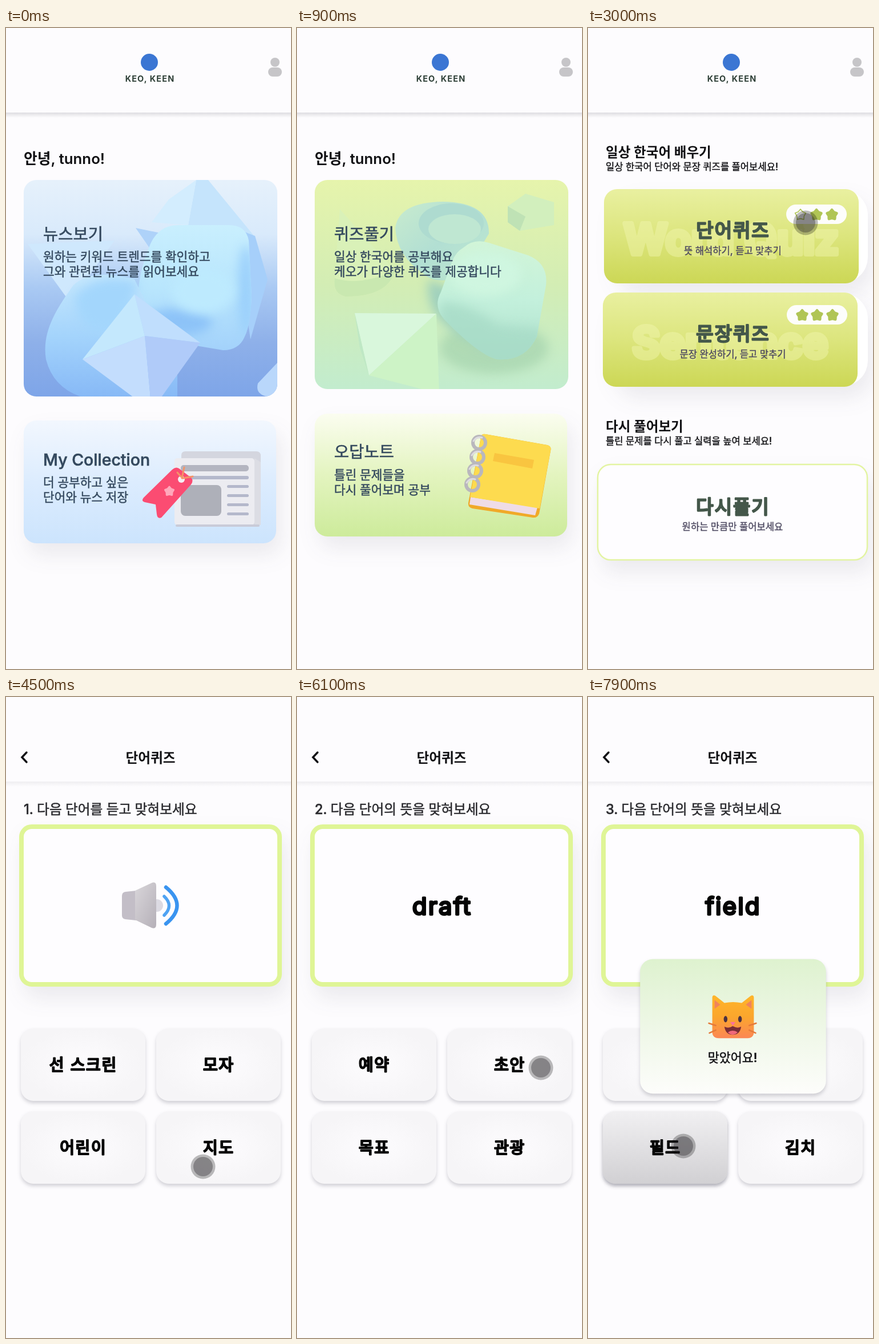
Recreate the animation shown at these times as an HTML page. Size 499 px wide and 1122 px high, loop 8000 ms.

```html
<!DOCTYPE html>
<html lang="ko">
<head>
<meta charset="utf-8">
<style>
html, body { margin: 0; width: 100%; height: 100%; overflow: hidden; background: #fdfcfe; }
svg { display: block; font-family: Inter, 'Noto Sans CJK KR', 'Noto Sans CJK', sans-serif; }
.soft { filter: drop-shadow(8px 20px 18px rgba(60,60,80,.09)); }
.key { filter: drop-shadow(0 4px 3px rgba(40,40,60,.2)); }
.blur { filter: blur(9px); }
.round { stroke: currentColor; stroke-width: .085em; stroke-linejoin: round; letter-spacing: .06em; }
</style>
</head>
<body>
<script>
const LOOP = 8000, INK = '#34495e', DARK = '#111114';
const rect = (x, y, w, h, r, fill, more = '') =>
  `<rect x="${x}" y="${y}" width="${w}" height="${h}" rx="${r}" fill="${fill}" ${more}/>`;
const circle = (x, y, r, fill, more = '') => `<circle cx="${x}" cy="${y}" r="${r}" fill="${fill}" ${more}/>`;
const ellipse = (x, y, rx, ry, fill, more = '') => `<ellipse cx="${x}" cy="${y}" rx="${rx}" ry="${ry}" fill="${fill}" ${more}/>`;
const path = (d, fill, more = '') => `<path d="${d}" fill="${fill}" ${more}/>`;
const stroke = (d, color, width) => path(d, 'none', `stroke="${color}" stroke-width="${width}" stroke-linecap="round"`);
const text = (s, x, y, size, weight = 500, fill = INK, more = '') =>
  `<text x="${x}" y="${y}" font-size="${size}" font-weight="${weight}" fill="${fill}" ${more}>${s}</text>`;
// A hairline outline gives regular Hangul a medium weight.
const medium = (s, x, y, size, fill = INK, more = '') =>
  text(s, x, y, size, 500, fill, `stroke="${fill}" stroke-width="${size * .022}" ${more}`);
const MIDDLE = 'text-anchor="middle" ';
const rounded = (s, x, y, size, color) => text(s, x + size * .03, y, size, 400, color, MIDDLE + `class="round" color="${color}"`);
const group = (id, body, more = '') => `<g id="${id}" ${more}>${body}</g>`;
const gradient = (id, colors, end = 'x2="0" y2="1"') => `<linearGradient id="${id}" ${end}>` +
  colors.map((c, i) => `<stop offset="${i / (colors.length - 1)}" stop-color="${c}"/>`).join('') + '</linearGradient>';
const clip = (id, shape) => `<clipPath id="${id}">${shape}</clipPath>`;

const gemShape = 'M300 345H388Q420 344 425 372L430 470Q428 520 418 540 408 564 380 564L285 548Q234 530 231 470 232 430 250 385 264 346 300 345Z';
const cubeShape = 'M292 384Q310 368 336 376L405 398Q440 412 436 450L420 540Q400 584 350 580 318 572 258 510 238 488 252 462L272 408Q278 392 292 384Z';
const defs = '<defs>' +
  gradient('sky', ['#e6f1fb', '#d9eafb', '#a9c9f3', '#8eb0e9', '#7ea5e8']) +
  gradient('gem', ['#c9effe', '#b9e6fd', '#a3d2fb']) +
  gradient('cup', ['#c6e8fd', '#a4d4fc', '#87b9f6']) +
  gradient('pale', ['#f2f7fe', '#dcecfe', '#cce4fd']) +
  gradient('lime', ['#e6f4ac', '#d3edb4', '#c2ecce']) +
  gradient('mint', ['#d2f5d8', '#c3f0dc', '#aee0cb']) +
  gradient('pot', ['#c8ebce', '#b2dfd3', '#bfe9cf'], 'x2="1" y2="1"') +
  gradient('leaf', ['#fbfdf0', '#e3f4bf', '#cdeb9b']) +
  gradient('olive', ['#e9f0a0', '#dce57d', '#ccd755']) +
  gradient('toast', ['#def2cf', '#eef7e6', '#fdfdfb']) +
  gradient('held', ['#f1f0f2', '#d1d0d3']) +
  gradient('steel', ['#d9d6da', '#b5b0b8'], 'x2="1" y2="1"') +
  gradient('fur', ['#ffb52a', '#fba62d', '#fb8755']) +
  gradient('edge', ['#dedde1', '#fdfcfe']) +
  '<radialGradient id="button"><stop stop-color="#fdfcfe"/><stop offset="1" stop-color="#f6f5f7"/></radialGradient>' +
  clip('newsClip', rect(31, 266, 444, 379, 22)) + clip('quizClip', rect(31, 266, 444, 366, 22)) +
  clip('gemClip', path(gemShape)) + clip('cubeClip', path(cubeShape)) + '</defs>';

const newsShapes =
  path('M333 266H354L436 366 319 345Z', '#c5e4fc') + path('M333 266L319 345 255 340 285 300Z', '#d3edfe') +
  path('M227 350L276 360 252 386Z', '#aed2f9') + path('M38 378L190 372 112 480Z', '#cfe8fd') +
  path('M400 350L436 364 458 440 428 545Z', '#a6cffa') + path(gemShape, 'url(#gem)') +
  group('', ellipse(300, 515, 60, 24, '#8dc3f8', 'class="blur"') + ellipse(420, 460, 14, 80, '#9bd0fb', 'class="blur"') +
    ellipse(345, 460, 55, 40, '#bdeafe', 'class="blur"'), 'clip-path="url(#gemClip)"') +
  path('M118 450C90 490 62 530 70 580Q82 628 130 645H300V590L225 440Q150 420 118 450Z', 'url(#cup)') +
  path('M120 470Q130 555 205 525L232 445Q160 425 120 470Z', '#a3d6fc', 'class="blur"') +
  path('M225 466L134 580 243 539Z', '#c4e8fd') + path('M225 466L340 551 243 539Z', '#c0defd') +
  path('M134 580L243 539 255 670Z', '#c3ddfd') + path('M243 539L340 551 255 670Z', '#b0cbf9') +
  path('M475 586L441 622Q436 640 456 645H475Z', '#b9d7fb');
const paper = path('M307 748Q307 741 314 741H438Q446 741 446 749V869H307Z', '#d4d6df') +
  rect(295, 753, 140, 117, 5, '#ececf1') + path('M435 753V870H446V760Z', '#dcdde4') +
  stroke('M299 871H442', '#c9cbd8', 4) + rect(306, 765, 119, 11, 5, '#b4b5c0') + rect(306, 784, 119, 6, 3, '#b4b8cb') +
  rect(306, 800, 71, 54, 8, '#aeb0b9') + [0, 16, 32, 48].map(y => rect(387, 800 + y, 38, 5, 2.5, '#b4b8cb')).join('');
const star = (x, y, r, fill, line = fill, width = 5) => {
  let d = '';
  for (let i = 0; i < 10; i++) {
    const a = i * Math.PI / 5 - Math.PI / 2, q = i % 2 ? r * .66 : r;
    d += (i ? 'L' : 'M') + (x + q * Math.cos(a)).toFixed(1) + ' ' + (y + q * Math.sin(a)).toFixed(1);
  }
  return path(d + 'Z', fill, `stroke="${line}" stroke-width="${width}" stroke-linejoin="round"`);
};
const bookmark = path('M303 771L324 787Q329 792 324 799L272 857Q265 860 264 851L262 834 243 830Q236 828 241 822L291 773Q297 767 303 771Z', '#fb4c72') +
  star(286, 811, 8, '#ffa8bb', '#ffa8bb', 3) + circle(307, 790, 6, '#f6eef4') + stroke('M308 788L312 769M310 788L327 785M306 785L300 778', '#f49468', 3);

const lines = (title, y, a, b, bodyY = y + 37.5) =>
  medium(title, 65, y, 28.5) + medium(a, 65, bodyY, 21.4) + medium(b, 65, bodyY + 26, 21.4);
const newsPage = rect(31, 266, 444, 379, 22, 'url(#sky)') + group('', newsShapes, 'clip-path="url(#newsClip)"') +
  lines('뉴스보기', 370.5, '원하는 키워드 트렌드를 확인하고', '그와 관련된 뉴스를 읽어보세요') +
  rect(31, 687, 442, 215, 22, 'url(#pale)', 'class="soft"') + paper + bookmark +
  lines('My Collection', 766, '더 공부하고 싶은', '단어와 뉴스 저장', 802.5);

const quizShapes =
  path('M75 317L171 425Q160 470 85 470 62 465 66 440Z', '#d9f1b8') +
  path('M66 438Q110 452 171 425 160 470 85 470 62 465 66 438Z', '#c9e8b0') +
  ellipse(345, 560, 95, 45, '#a5d3ae', 'class="blur" opacity=".7"') +
  path('M172 350Q178 305 255 304 337 305 336 360L290 436Q240 450 222 430Q175 400 172 350Z', 'url(#pot)') +
  ellipse(270, 342, 57, 35, '#aedbd0') + ellipse(276, 352, 46, 26, '#bfe7d2') +
  path('M230 440Q222 510 300 545L340 570 300 470Z', '#9fd0bd', 'class="blur"') +
  path(cubeShape, 'url(#mint)') +
  group('', path('M252 478Q300 480 352 520L430 528V600H240Z', '#a6dac6', 'class="blur" opacity=".75"') +
    ellipse(330, 430, 62, 38, '#cff6e0', 'class="blur"'), 'clip-path="url(#cubeClip)"') +
  path('M101 499L244 500 126 608Z', '#d9f7dc') + path('M244 500L249 640 126 608Z', '#cdf3c6') +
  path('M126 608L101 499 110 560Z', '#bfe8c5') +
  path('M369 312L400 290 450 305V345L390 355 369 340Z', '#d2efbd') + path('M369 312L400 330 390 355 369 340Z', '#bfe2b5');
const rings = [[319, 726], [316, 751], [312, 775], [307, 799]]
  .map(([x, y]) => circle(x, y, 11, 'none', 'stroke="#b9b7bd" stroke-width="6"') +
    stroke(`M${x - 10} ${y - 3}Q${x - 4} ${y - 12} ${x + 5} ${y - 9}`, '#dedce0', 3)).join('');
const notebook = path('M322 716Q323 710 330 711L438 730Q446 732 444 740L424 850Q421 858 413 857L307 841Q299 839 300 831Z', '#f0a928') +
  path('M304 821L421 839 417 853 302 834Z', '#efdce6') +
  path('M322 716Q323 710 330 711L438 730Q446 732 444 740L425 841 303 821Z', '#fddb4f') +
  path('M346 744L415 756 412 771 343 758Z', '#f9c540') + rings;
const quizPage = rect(31, 266, 444, 366, 22, 'url(#lime)') + group('', quizShapes, 'clip-path="url(#quizClip)"') +
  lines('퀴즈풀기', 370.5, '일상 한국어를 공부해요', '케오가 다양한 퀴즈를 제공합니다') +
  rect(31, 675, 442, 215, 22, 'url(#leaf)', 'class="soft"') + notebook +
  lines('오답노트', 752, '틀린 문제들을', '다시 풀어보며 공부', 790);

const home = text('안녕, tunno!', 31, 238, 25.8, 600, DARK) +
  group('slides', newsPage + group('', quizPage, 'transform="translate(524)"'));

const GREEN = '#b0c555', TITLE = '#44574a', SUB = '#4d4960';
const quizCard = (x, y, title, sub, ghost, ghostX, pillX, pillY, stars) =>
  rect(x + 12, y + 1, 478 - x, 163, 45, '#fff', 'class="soft"') + rect(x, y, 446, 165, 23, 'url(#olive)') +
  text(ghost, ghostX, y + 114, 74, 700, '#f4f8b4', MIDDLE + 'stroke="#f4f8b4" stroke-width="8" stroke-linejoin="round" opacity=".42"') +
  rect(pillX, pillY, 106, 34, 17, '#fdfdfb') + stars +
  rounded(title, 253, y + 84, 33, TITLE) + medium(sub, 253.5, y + 113.5, 16.6, SUB, MIDDLE);
const list = text('일상 한국어 배우기', 31, 226, 23.6, 700, DARK) +
  medium('일상 한국어 단어와 문장 퀴즈를 풀어보세요!', 31, 249, 16.6, DARK) +
  quizCard(28, 282, '단어퀴즈', '뜻 해석하기, 듣고 맞추기', 'Word Quiz', 251, 347, 309,
    star(372, 327, 10, '#fdfdfb', GREEN, 1.6) + star(400, 327, 8.5, GREEN) + star(427, 327, 8.5, GREEN)) +
  quizCard(26, 463, '문장퀴즈', '문장 완성하기, 듣고 맞추기', 'Sentence', 249, 348, 485,
    [375, 401, 428].map(x => star(x, 503, 8.5, GREEN)).join('')) +
  text('다시 풀어보기', 31, 706, 23.6, 700, DARK) +
  medium('틀린 문제를 다시 풀고 실력을 높여 보세요!', 31, 729, 16.6, DARK) +
  rect(17, 764, 472, 167, 23, '#fefdff', 'stroke="#e3f4a2" stroke-width="2.5" class="soft"') +
  rounded('다시풀기', 253, 850, 33, TITLE) + medium('원하는 만큼만 풀어보세요', 253, 879, 16.6, SUB, MIDDLE);

const header = circle(251, 60, 15, '#3b76d3') +
  text('KEO, KEEN', 252, 94, 14.5, 700, '#2f4038', MIDDLE + 'letter-spacing="1.1"') +
  circle(471, 60, 8, '#c6c5c8') + rect(459, 69, 24, 16, 8, '#c6c5c8');

const speaker = path('M209 341L228 339V391L209 389Q203 388 203 382V348Q203 342 209 341Z', '#c3bec7') +
  circle(264, 365, 11, '#dcdae2') + path('M226 339L256 325Q263 323 263 331V398Q263 407 255 404L226 390Z', 'url(#steel)') +
  stroke('M277 349Q294 365 277 382', '#4fa3f3', 5.5) + stroke('M280 333Q319 365 280 397', '#3a94f0', 6.5);
const cat = path('M218 526Q219 521 224 524L239 536Q254 533 269 536L284 524Q289 521 290 526V586Q290 597 279 597H229Q218 597 218 586Z', 'url(#fur)') +
  path('M222 531L232 539 222 546ZM286 531L276 539 286 546Z', '#f0845c') +
  ellipse(241, 564, 3.2, 5.5, '#4b3140') + ellipse(266, 564, 3.2, 5.5, '#4b3140') +
  path('M239 577Q246 581 253.5 576 261 581 268 577 266 591 253.5 591 241 591 239 577Z', '#7a2d35') +
  path('M245 587Q253 581 262 587 258 591 253 591 249 591 245 587Z', '#f0687a') +
  path('M249 569H258L253.5 575Z', '#fb6fa0') +
  stroke('M212 571L224 575M213 588L224 583M294 571L282 575M293 588L282 583', '#e57a3a', 2.5);

const questions = [
  { from: 3200, press: 4560, pick: 3, ask: '1. 다음 단어를 듣고 맞혀보세요', word: '', options: ['선 스크린', '모자', '어린이', '지도'] },
  { from: 5300, press: 6160, pick: 1, ask: '2. 다음 단어의 뜻을 맞혀보세요', word: 'draft', options: ['예약', '초안', '목표', '관광'] },
  { from: 7000, press: 7860, pick: 2, ask: '3. 다음 단어의 뜻을 맞혀보세요', word: 'field', options: ['여행', '바다', '필드', '김치'] },
];
const buttonAt = i => [i % 2 ? 263 : 26, i < 2 ? 580 : 725];
const button = (i, fill, id = '') => rect(...buttonAt(i), 218, 127, 22, fill, `class="key" id="${id}"`);
const question = (q, n) => group('q' + n,
  medium(q.ask, 31, 205, 23.7, '#2a2a2e') + (q.word ? rounded(q.word, 253, 381, 41.5, '#050505') : speaker) +
  button(q.pick, 'url(#held)', 'held' + n) +
  q.options.map((s, i) => { const [x, y] = buttonAt(i); return rounded(s, x + 108.5, y + 73.5, 28, '#050505'); }).join(''));
const quiz = stroke('M36 97L28 105.5 36 114', DARK, 3.5) + text('단어퀴즈', 253, 115, 23.7, 600, DARK, MIDDLE) +
  rect(27, 227, 452, 276, 18, '#fefdff', 'stroke="#dff596" stroke-width="8" class="soft"') +
  [0, 1, 2, 3].map(i => button(i, 'url(#button)')).join('') + questions.map(question).join('') +
  group('popup', rect(93, 460, 322, 233, 22, 'url(#toast)', 'class="key"') + cat + medium('맞았어요!', 253, 638, 21.5, DARK, MIDDLE));

document.body.innerHTML = `<svg width="499" height="1122" viewBox="0 0 499 1122">${defs}` +
  rect(0, 0, 499, 1122, 0, '#fdfcfe') + rect(0, 148, 499, 9, 0, 'url(#edge)', 'id="edgeLine"') +
  group('header', header) + group('home', home) + group('list', list) + group('quiz', quiz) +
  group('cursor', circle(0, 0, 21.5, '#000', 'opacity=".26"') + circle(0, 0, 17, '#28262a', 'opacity=".36"')) + '</svg>';

const el = id => document.getElementById(id);
const show = (id, on) => el(id).setAttribute('display', on ? 'inline' : 'none');
const cursorPath = [
  [1000, 117, 407], [1700, 117, 407], [1950, 215, 426], [2200, 380, 230], [2400, 444, 265], [2600, 381, 341],
  [3200, 381, 341], [3450, 432, 621], [3550, 432, 621], [3700, 260, 360], [4050, 260, 360], [4300, 276, 380],
  [4410, 276, 380], [4490, 345, 822], [5250, 345, 822], [5700, 420, 357], [6010, 420, 357], [6090, 427, 649],
  [6950, 427, 649], [7450, 437, 655], [7810, 437, 655], [7880, 167, 786], [8000, 167, 786],
];
function cursorAt(t) {
  const i = Math.max(1, cursorPath.findIndex(p => p[0] >= t));
  const [t0, x0, y0] = cursorPath[i - 1], [t1, x1, y1] = cursorPath[i];
  const k = (t - t0) / (t1 - t0);
  return [x0 + (x1 - x0) * k, y0 + (y1 - y0) * k];
}

function draw(t) {
  const inHome = t < 1050, inQuiz = t >= 3200;
  show('home', inHome);
  show('list', !inHome && !inQuiz);
  show('quiz', inQuiz);
  show('header', !inQuiz);
  el('edgeLine').setAttribute('opacity', inQuiz ? .45 : 1);
  const swipe = Math.min(1, Math.max(0, (t - 100) / 800));
  el('slides').setAttribute('transform', `translate(${-524 * (1 - (1 - swipe) ** 2.24)})`);

  const current = questions.filter(q => t >= q.from).pop();
  questions.forEach((q, n) => {
    show('q' + n, q === current);
    show('held' + n, t >= q.press);
  });
  const age = current ? t - current.press : -1;
  show('popup', age >= 0);
  if (age >= 0) {
    const scale = 1 - .7 * Math.exp(-age / 45) * Math.cos(age * Math.PI / 80);
    el('popup').setAttribute('transform', `translate(254 576.5) scale(${scale}) translate(-254 -576.5)`);
    el('popup').setAttribute('opacity', Math.min(1, age / 30));
  }

  show('cursor', t >= 1050);
  if (t >= 1050) el('cursor').setAttribute('transform', `translate(${cursorAt(t)})`);
}
const start = performance.now();
function tick() {
  draw((performance.now() - start) % LOOP);
  requestAnimationFrame(tick);
}
tick();
</script>
</body>
</html>
```
